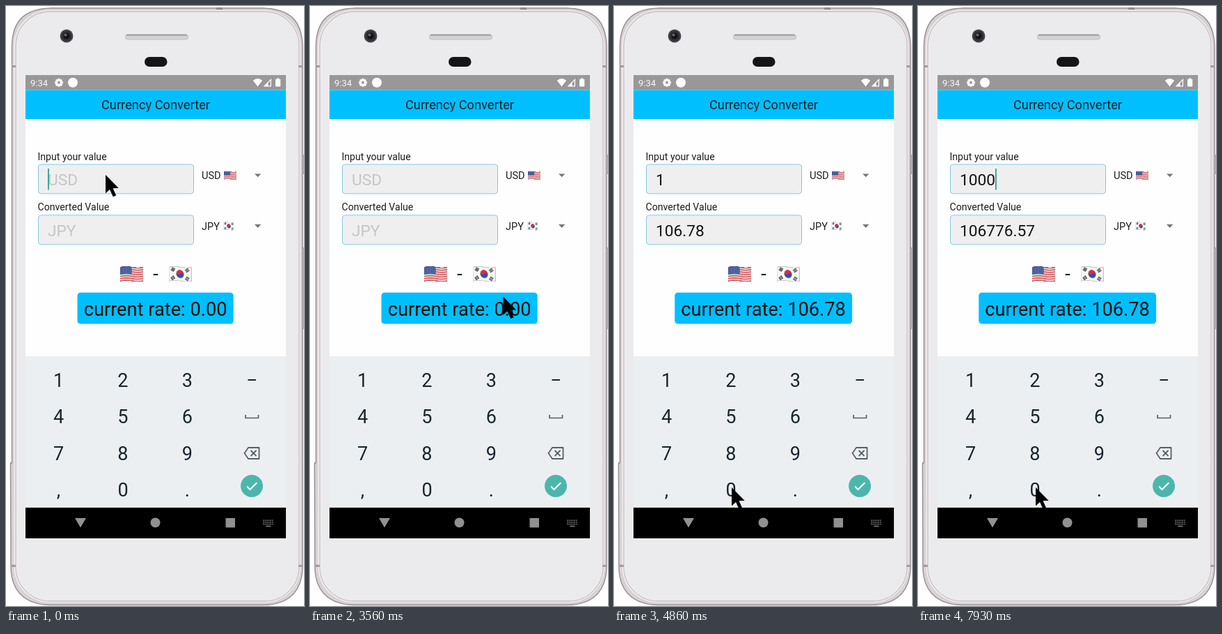
An HTML page with a canvas that plays this animation: 428 px wide and 860 px high, repeating every 8000 ms.

```html
<!DOCTYPE html>
<html lang="en">
<head>
<meta charset="utf-8">
<title>Currency Converter</title>
<style>
html, body { margin: 0; width: 100%; height: 100%; overflow: hidden; background: #fefefe; }
canvas { display: block; }
</style>
</head>
<body>
<canvas id="stage" width="428" height="860"></canvas>
<script>
const LOOP = 8000, RATE = 106.77657, DIGIT = 12.75;
const ctx = document.getElementById('stage').getContext('2d');

// caret visibility flips at each of these times
const blinks = [260, 760, 1230, 1730, 2260, 2760, 3300, 3760, 4800, 5100, 6030, 6530, 7400, 7930];
// key presses: down, up, time of the new result, cell corner
const presses = [
  { down: 4230, up: 4330, done: 4500, x: 30, y: 510 },
  { down: 4930, up: 5100, done: 5160, x: 122, y: 667 },
  { down: 5330, up: 5500, done: 5560, x: 122, y: 667 },
  { down: 6730, up: 6900, done: 6960, x: 122, y: 667 }
];
// pointer: time, x, y
const track = [
  [3270, 143, 242], [3400, 193, 312], [3560, 277, 416], [3670, 292, 455],
  [3850, 178, 514], [4060, 76, 537], [4240, 76, 537], [4360, 116, 604],
  [4500, 148, 655], [4650, 164, 683], [4830, 169, 690]
];

function box(x, y, w, h, r, fill, stroke, line = 1) {
  ctx.beginPath();
  ctx.roundRect(x, y, w, h, r);
  if (fill) { ctx.fillStyle = fill; ctx.fill(); }
  if (stroke) { ctx.strokeStyle = stroke; ctx.lineWidth = line; ctx.stroke(); }
}

function disc(x, y, r, fill, c = ctx) {
  c.fillStyle = fill;
  c.beginPath();
  c.arc(x, y, r, 0, 7);
  c.fill();
}

function poly(points, fill) {
  ctx.fillStyle = fill;
  ctx.beginPath();
  points.forEach(([x, y]) => ctx.lineTo(x, y));
  ctx.closePath();
  ctx.fill();
}

function wire(points, color, width) {
  ctx.strokeStyle = color;
  ctx.lineWidth = width;
  ctx.beginPath();
  points.forEach(([x, y]) => ctx.lineTo(x, y));
  ctx.stroke();
}

function text(str, x, y, size, color = '#111', align = 'left') {
  ctx.font = size + 'px Roboto, sans-serif';
  ctx.textAlign = align;
  ctx.fillStyle = color;
  ctx.fillText(str, x, y);
}

function makeFlag(paint) {
  const c = document.createElement('canvas');
  c.width = 132;
  c.height = 80;
  paint(c.getContext('2d'));
  return c;
}

const usFlag = makeFlag(c => {
  for (let i = 0; i < 13; i++) {
    c.fillStyle = i % 2 ? '#eeeeee' : '#cf4a50';
    c.fillRect(0, i * 80 / 13, 132, 80 / 13 + 1);
  }
  c.fillStyle = '#3a5590';
  c.fillRect(0, 0, 66, 43);
  for (let row = 0; row < 5; row++)
    for (let col = 0; col < 6; col++) disc(8 + col * 10, 6 + row * 7.8, 1.6, '#e6eaf2', c);
});

const krFlag = makeFlag(c => {
  c.fillStyle = '#f8f8f8';
  c.fillRect(0, 0, 132, 80);
  c.strokeStyle = '#c9c9c9';
  c.lineWidth = 4;
  c.strokeRect(2, 2, 128, 76);
  c.save();
  c.translate(66, 40);
  c.rotate(0.5);
  disc(0, 0, 22, '#1f56b3', c);
  c.fillStyle = '#d72c3c';
  c.beginPath();
  c.arc(0, 0, 22, Math.PI, 0);
  c.fill();
  disc(-11, 0, 11, '#d72c3c', c);
  disc(11, 0, 11, '#1f56b3', c);
  c.restore();
  // trigrams: side x, side y, bits of broken bars
  [[-1, -1, 0], [1, 1, 7], [1, -1, 5], [-1, 1, 2]].forEach(([sx, sy, bits]) => {
    c.save();
    c.translate(66 + sx * 41, 40 + sy * 23);
    c.rotate(-sx * sy);
    for (let i = 0; i < 3; i++) {
      c.fillStyle = '#222';
      c.fillRect(-10, i * 7 - 9, 20, 4.5);
      if (bits >> i & 1) {
        c.fillStyle = '#f8f8f8';
        c.fillRect(-1.5, i * 7 - 9, 3, 4.5);
      }
    }
    c.restore();
  });
});

// waving flag, drawn in narrow columns
function flag(img, x, y, w, h) {
  const n = Math.round(w), amp = h * 0.035, body = h - 2 * amp;
  ctx.imageSmoothingQuality = 'high';
  for (let i = 0; i < n; i++) {
    const dy = amp - amp * Math.sin(i / n * Math.PI * 2);
    ctx.drawImage(img, i * 132 / n, 0, 132 / n, 80, x + i * w / n, y + dy, w / n, body);
  }
}

function phone() {
  ctx.fillStyle = '#fefefe';
  ctx.fillRect(0, 0, 428, 860);
  box(423, 213.5, 5, 27, 1.5, '#d9d5d6', '#9c9597');
  box(423, 346.5, 5, 116, 1.5, '#d9d5d6', '#9c9597');

  ctx.beginPath();
  ctx.moveTo(65, 3);
  ctx.lineTo(368, 3);
  ctx.bezierCurveTo(405, 4, 425, 18, 426, 58);
  ctx.lineTo(426, 805);
  ctx.bezierCurveTo(425, 840, 405, 858, 370, 858.5);
  ctx.lineTo(64, 858.5);
  ctx.bezierCurveTo(28, 858, 8, 840, 7, 805);
  ctx.lineTo(6.5, 655);
  ctx.lineTo(8.5, 655);
  ctx.lineTo(8.5, 58);
  ctx.bezierCurveTo(9, 18, 30, 4, 65, 3);
  ctx.fillStyle = '#d8d1d3';
  ctx.fill();
  ctx.strokeStyle = '#968f91';
  ctx.lineWidth = 1.4;
  ctx.stroke();

  box(11.5, 6, 411.5, 849, 51, '#f3f0f1');
  box(14, 8, 407, 845, 49, '#ebebed', '#c6bfc2', 1.3);
  [[8, 85], [420, 85], [8, 801], [420, 801]].forEach(([x, y]) => {
    ctx.fillStyle = '#a39b9e';
    ctx.fillRect(x, y, 6, 3);
  });
  box(302, 2, 9, 3, 0, '#8f898b');

  disc(87, 43, 9.5, '#4a4a4d');
  disc(87, 43, 7.5, '#2d2d31');
  disc(87, 43, 4.2, '#121218');
  disc(85.5, 41.5, 2, '#66676f');
  box(171.5, 41, 90, 7, 3, '#d4d2d5', '#bdbabd');
  box(173, 40.8, 87, 1.8, 1, '#98969a');
  box(199, 73, 32.5, 14, 7, '#151515');
}

function statusBar() {
  ctx.fillStyle = '#989898';
  ctx.fillRect(28, 99, 374, 21.5);
  text('9:34', 35, 114.7, 13, '#f7f7f7');
  for (let i = 0; i < 8; i++) {
    ctx.save();
    ctx.translate(76, 109.8);
    ctx.rotate(i * Math.PI / 4);
    box(-1.5, -6, 3, 4, 0.6, '#fff');
    ctx.restore();
  }
  disc(76, 109.8, 4.5, '#fff');
  disc(76, 109.8, 2, '#989898');
  disc(96, 109.8, 7, '#fff');

  ctx.fillStyle = '#fff';
  ctx.beginPath();
  ctx.moveTo(361.5, 115.5);
  ctx.lineTo(354.8, 106.8);
  ctx.quadraticCurveTo(361.5, 101.4, 368.2, 106.8);
  ctx.fill();
  poly([[369.5, 115.5], [381, 104], [381, 115.5]], '#fff');
  poly([[376.5, 110.3], [379.8, 107], [379.8, 114.3], [376.5, 114.3]], '#989898');
  box(387, 104.8, 7.2, 10.8, 1, '#fff');
  ctx.fillRect(389, 103.5, 3.2, 2);
}

function keypad() {
  const ink = '#17262d', gray = '#55626a';
  '123456789'.split('').forEach((d, i) =>
    text(d, 75.5 + i % 3 * 92.4, 545.7 + Math.floor(i / 3) * 52.4, 27, ink, 'center'));
  text(',', 75.5, 702.8, 27, ink, 'center');
  text('0', 168, 702.8, 27, ink, 'center');
  text('.', 260.3, 702.8, 27, ink, 'center');
  ctx.fillStyle = ink;
  ctx.fillRect(347.5, 535, 11.5, 2);
  wire([[344, 586], [344, 590.5], [362.5, 590.5], [362.5, 586]], gray, 1.7);
  ctx.lineJoin = 'round';
  wire([[342.5, 641], [348, 633], [363.5, 633], [363.5, 649], [348, 649], [342.5, 641], [343, 640]], gray, 1.8);
  wire([[351.5, 637], [359.5, 645]], gray, 1.8);
  wire([[359.5, 637], [351.5, 645]], gray, 1.8);
  ctx.lineJoin = 'miter';
  disc(353, 688, 16, '#4db6ac');
  wire([[346, 688.5], [350.5, 693], [360.3, 683.2]], '#fff', 2);
}

function navBar() {
  const gray = '#919191';
  ctx.fillStyle = '#000';
  ctx.fillRect(28, 719, 374, 44);
  poly([[99, 734], [115, 734], [107, 747.5]], gray);
  disc(214.5, 740.5, 7, gray);
  box(315.5, 734, 13.5, 13.5, 1, gray);
  ctx.fillStyle = '#777';
  for (let row = 0; row < 3; row++)
    for (let col = 0; col < 6; col++) ctx.fillRect(369 + col * 2.6, 736.5 + row * 2.7, 1.6, 1.6);
  ctx.fillRect(373, 744.8, 7.5, 1.6);
}

function field(label, y, value, hint) {
  text(label, 45.5, y - 6, 14.1, '#1c1c1c');
  box(46.5, y + 0.5, 223, 42, 4, '#efefef', '#7fcbea');
  text(value || hint, 60, y + 30.6, 22.7, value ? '#141414' : '#c6c6c6');
}

function picker(code, y) {
  text(code, 281, y + 5.2, 14.5, '#1c1c1c');
  poly([[357, y - 2.3], [366.3, y - 2.3], [361.65, y + 2.6]], '#757575');
}

function pointerAt(t) {
  const n = track.length;
  if (t <= track[0][0]) return track[0].slice(1);
  if (t >= track[n - 1][0]) return track[n - 1].slice(1);
  let i = 0;
  while (track[i + 1][0] <= t) i++;
  const a = track[i], b = track[i + 1], span = b[0] - a[0], u = (t - a[0]) / span;
  const slope = (k, d) => {
    const p = track[k - 1], q = track[k + 1];
    const rests = !p || !q || k === 5 || k === 6;
    return rests ? 0 : (q[d] - p[d]) / (q[0] - p[0]) * span;
  };
  return [1, 2].map(d =>
    (1 + 2 * u) * (1 - u) ** 2 * a[d] + u * (1 - u) ** 2 * slope(i, d) +
    u * u * (3 - 2 * u) * b[d] + u * u * (u - 1) * slope(i + 1, d));
}

function pointer(x, y) {
  const shape = [[0, 0], [0, 26.5], [6, 21], [10.8, 31.5], [15.2, 29.6], [10.5, 19.3], [18.7, 19]];
  poly(shape.map(([dx, dy]) => [x + dx, y + dy]), '#000');
}

function draw(t) {
  const typed = presses.filter(p => t >= p.up).length;
  const solved = presses.filter(p => t >= p.done).length;
  const input = typed ? '1' + '0'.repeat(typed - 1) : '';
  const output = solved ? (RATE * 10 ** (solved - 1)).toFixed(2) : '';

  phone();
  ctx.fillStyle = '#fefefe';
  ctx.fillRect(28, 120, 374, 382);
  statusBar();
  ctx.fillStyle = '#00bfff';
  ctx.fillRect(28, 120.5, 374, 41.5);
  text('Currency Converter', 215, 148, 18.3, '#10212b', 'center');

  field('Input your value', 226.5, input, 'USD');
  field('Converted Value', 299.3, output, 'JPY');
  picker('USD', 242.7);
  picker('JPY', 315.3);
  flag(usFlag, 313, 236.7, 18, 12.3);
  flag(krFlag, 312, 309.3, 16, 12.3);
  if (blinks.filter(b => t >= b).length % 2 === 0) {
    ctx.fillStyle = '#2f9e92';
    ctx.fillRect(60 + typed * DIGIT, 233, 1.8, 30.5);
  }

  flag(usFlag, 164, 373, 33, 22.5);
  flag(krFlag, 233.5, 373, 33, 22.5);
  text('-', 215, 393, 27.24, '#111', 'center');
  const rate = 'current rate: ' + (solved ? RATE : 0).toFixed(2);
  ctx.font = '27.24px Roboto, sans-serif';
  const w = ctx.measureText(rate).width + 18.2;
  box(214.6 - w / 2, 410.7, w, 44.8, 4.5, '#00bfff');
  text(rate, 214.6, 443.7, 27.24, '#111', 'center');

  ctx.fillStyle = '#eceff1';
  ctx.fillRect(28, 502, 374, 217);
  const held = presses.find(p => t >= p.down && t < p.up);
  if (held) box(held.x, held.y, 92, 52.5, 2, '#d3d7d9');
  keypad();
  navBar();
  pointer(...pointerAt(t));
}

function tick() {
  draw(performance.now() % LOOP);
  requestAnimationFrame(tick);
}
tick();
</script>
</body>
</html>
```
